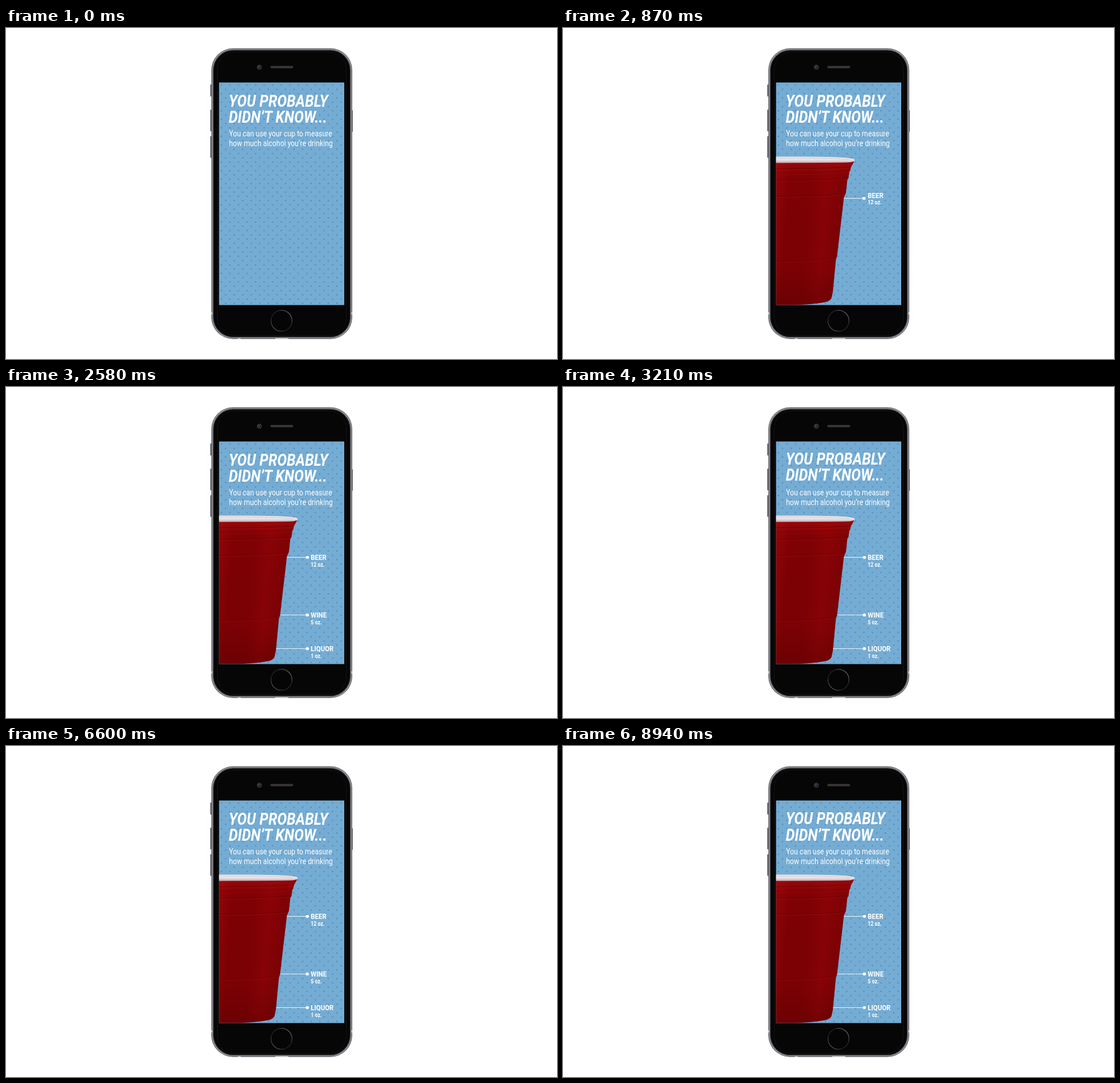
Write an HTML page that moves like this. It is 966 px wide and 580 px high and loops after 8970 ms.

```html
<!DOCTYPE html>
<html lang="en">
<head>
<meta charset="utf-8">
<title>Cup measures</title>
<style>
  html, body { margin: 0; width: 100%; height: 100%; overflow: hidden; background: #fff; }
  svg { display: block; width: 966px; height: 580px; }
  text { fill: #fff; font-family: Roboto, "Open Sans", Arial, sans-serif; }
  .title { font-size: 29px; font-weight: 600; font-style: italic; }
  .body { font-size: 14.2px; font-weight: 400; }
  .name { font-size: 13.2px; font-weight: 600; }
  .size { font-size: 10.2px; font-weight: 600; }
</style>
</head>
<body>
<svg viewBox="0 0 966 580" xmlns="http://www.w3.org/2000/svg">
  <defs>
    <linearGradient id="ring" x1="0" x2="1" y1="1" y2="0">
      <stop offset="0" stop-color="#6a6a6a"/>
      <stop offset=".35" stop-color="#202020"/>
      <stop offset=".65" stop-color="#2a2a2a"/>
      <stop offset="1" stop-color="#858585"/>
    </linearGradient>
    <linearGradient id="red" gradientUnits="userSpaceOnUse" x1="373" x2="508" y1="0" y2="10">
      <stop offset="0" stop-color="#960709"/>
      <stop offset=".14" stop-color="#8f0507"/>
      <stop offset=".32" stop-color="#7c0104"/>
      <stop offset=".6" stop-color="#7c0104"/>
      <stop offset=".8" stop-color="#870306"/>
      <stop offset="1" stop-color="#7c0205"/>
    </linearGradient>
    <linearGradient id="depth" x1="0" x2="0" y1="0" y2="1">
      <stop offset="0" stop-color="#c01318" stop-opacity=".4"/>
      <stop offset=".12" stop-color="#a00" stop-opacity=".1"/>
      <stop offset=".7" stop-color="#500" stop-opacity="0"/>
      <stop offset="1" stop-color="#400" stop-opacity=".3"/>
    </linearGradient>
    <linearGradient id="rim" x1="0" x2="0" y1="0" y2="1">
      <stop offset="0" stop-color="#f4eef0"/>
      <stop offset=".55" stop-color="#e6dfe3"/>
      <stop offset="1" stop-color="#b9a9b0"/>
    </linearGradient>
    <pattern id="dots" patternUnits="userSpaceOnUse" x="374" y="96" width="15" height="15">
      <g fill="#548dbb">
        <circle cx="3.500" cy="4" r="1.250"/>
        <circle cx="11" cy="11.500" r="1.250"/>
      </g>
    </pattern>
    <clipPath id="screen"><rect x="373.500" y="95.500" width="219.500" height="390"/></clipPath>
    <path id="side" d="M290 234H510Q508 239 505 243L503.500 250L502 252L500.500 263L498.500 266L496 289L492.500 297L480.500 400L478.500 406L473 463Q472 466 471 472Q470 477 463 479.500Q442 484.500 400 485.500H290Z"/>
  </defs>

  <g fill="#6b6a70">
    <rect x="358" y="99" width="4" height="21" rx="1"/>
    <rect x="358" y="143" width="4" height="38" rx="1"/>
    <rect x="358" y="189.500" width="4" height="38" rx="1"/>
    <rect x="604" y="144" width="4" height="38" rx="1"/>
  </g>
  <rect x="360" y="35.500" width="247" height="509.500" rx="38" fill="#5c5b61"/>
  <rect x="361" y="36.500" width="245" height="507.500" rx="37" fill="#929197"/>
  <rect x="362.800" y="38.300" width="241.400" height="503.900" rx="35.500" fill="#3a393d"/>
  <rect x="364.200" y="39.700" width="238.600" height="501.100" rx="34" fill="#060606"/>
  <rect x="370.500" y="42" width="226" height="497" rx="30" fill="none" stroke="#141414"/>
  <g fill="#b5b4b9">
    <rect x="406.500" y="543.200" width="5" height="1.800"/>
    <rect x="472" y="543.600" width="23" height="1.600" fill="#d0d0d2"/>
    <rect x="360" y="498" width="2" height="4"/>
    <rect x="605" y="498" width="2" height="4"/>
  </g>
  <circle cx="444.200" cy="68.800" r="4.300" fill="#3b3b40"/>
  <circle cx="444.200" cy="68.800" r="2.600" fill="#17171f"/>
  <circle cx="443.600" cy="68.200" r="1.200" fill="#55587a"/>
  <rect x="463.500" y="66.500" width="40" height="4" rx="2" fill="#3b3737"/>
  <circle cx="483" cy="513" r="18.400" fill="#050505" stroke="url(#ring)" stroke-width="1.300"/>

  <g clip-path="url(#screen)">
    <rect x="373" y="95" width="221" height="391" fill="#75acd3"/>
    <rect x="373" y="95" width="221" height="391" fill="url(#dots)"/>
    <g id="title"></g>
    <g id="body"></g>
    <g id="labels"></g>
    <g id="cup">
      <use href="#side" fill="url(#red)"/>
      <use href="#side" fill="url(#depth)"/>
      <g id="ridges" fill="none"></g>
      <path d="M290 225.500H430Q511.500 226 511.500 231Q511 235 500 235.500Q450 236.500 290 236.500Z" fill="url(#rim)"/>
      <path d="M290 227.800H430Q480 228 503 230.500" fill="none" stroke="#cfc3c9" stroke-width="1"/>
    </g>
  </g>
</svg>
<script>
  const LOOP = 8970, STEP = 30, CONDENSE = 0.865;
  const NS = "http://www.w3.org/2000/svg";
  const byId = id => document.getElementById(id);

  function add(parent, tag, attrs = {}) {
    const el = document.createElementNS(NS, tag);
    for (const key in attrs) el.setAttribute(key, attrs[key]);
    return parent.appendChild(el);
  }

  function write(parent, kind, x, y, words) {
    add(parent, "text", {
      class: kind,
      transform: `translate(${x} ${y}) scale(${CONDENSE} 1)`
    }).textContent = words;
  }

  const title = byId("title"), cup = byId("cup");
  write(title, "title", 390.5, 138, "YOU PROBABLY");
  write(title, "title", 390.5, 166.3, "DIDN’T KNOW...");
  write(byId("body"), "body", 391, 190, "You can use your cup to measure");
  write(byId("body"), "body", 391, 206.5, "how much alcohol you’re drinking");

  // Cup ridges: y at the left, end x, end y, strength
  [[247, 503.5, 244, .6], [255, 501.5, 251, .4], [267, 499.5, 263, .5],
   [295, 495, 290.5, .55], [409, 479, 402, .4]].forEach(([y, ex, ey, a]) => {
    const d = shift => `M290 ${y + shift}H380Q450 ${y + shift} ${ex} ${ey + shift}`;
    add(byId("ridges"), "path", { d: d(0), stroke: "#500003", "stroke-opacity": a });
    add(byId("ridges"), "path", { d: d(1.4), stroke: "#b5181c", "stroke-opacity": a * .7 });
  });

  // Label: name, size, line start x, line y, start time
  const labels = [
    ["BEER", "12 oz.", 491, 298.5, 500],
    ["WINE", "5 oz.", 480, 399.5, 870],
    ["LIQUOR", "1 oz.", 473, 458.5, 1240]
  ].map(([name, size, x, y, start], i) => {
    const root = byId("labels");
    const mask = add(root, "clipPath", { id: "mask" + i });
    add(mask, "rect", { x: 530, y: y - 18, width: 60, height: 46 });
    const line = add(root, "line", { x1: x, y1: y, y2: y, stroke: "#fff", "stroke-opacity": .85 });
    const dot = add(root, "circle", { cy: y, r: 2.8, fill: "#fff" });
    const words = add(add(root, "g", { "clip-path": `url(#mask${i})` }), "g");
    write(words, "name", 534.3, y + 4.9, name);
    write(words, "size", 534.3, y + 16.2, size);
    return { line, dot, words, x, start };
  });

  const easeOut = (t, start, length) => {
    const p = Math.min(1, Math.max(0, (t - start) / length));
    return 1 - (1 - p) ** 3;
  };

  // The title hops up and back, 900 ms long, every 2760 ms
  function hop(t) {
    const local = (t - 2580) % 2760;
    return t >= 2580 && local < 900 ? -3 * Math.sin(Math.PI * local / 900) : 0;
  }

  function draw(t) {
    title.setAttribute("transform", `translate(0 ${hop(t)})`);
    cup.setAttribute("transform", `translate(${-140 * (1 - easeOut(t, 0, 490))} 0)`);
    for (const { line, dot, words, x, start } of labels) {
      const grow = easeOut(t, start, 500), drop = easeOut(t, start + 164, 420);
      const end = x + (528.3 - x) * grow;
      line.setAttribute("x2", end);
      dot.setAttribute("cx", end);
      line.style.opacity = dot.style.opacity = grow > 0 ? 1 : 0;
      words.setAttribute("transform", `translate(0 ${-40 * (1 - drop)})`);
      words.style.opacity = Math.min(1, drop * 1.4);
    }
  }

  const begin = performance.now();
  function tick() {
    const t = (performance.now() - begin) % LOOP;
    draw(Math.floor(t / STEP) * STEP);
    requestAnimationFrame(tick);
  }
  tick();
</script>
</body>
</html>
```
